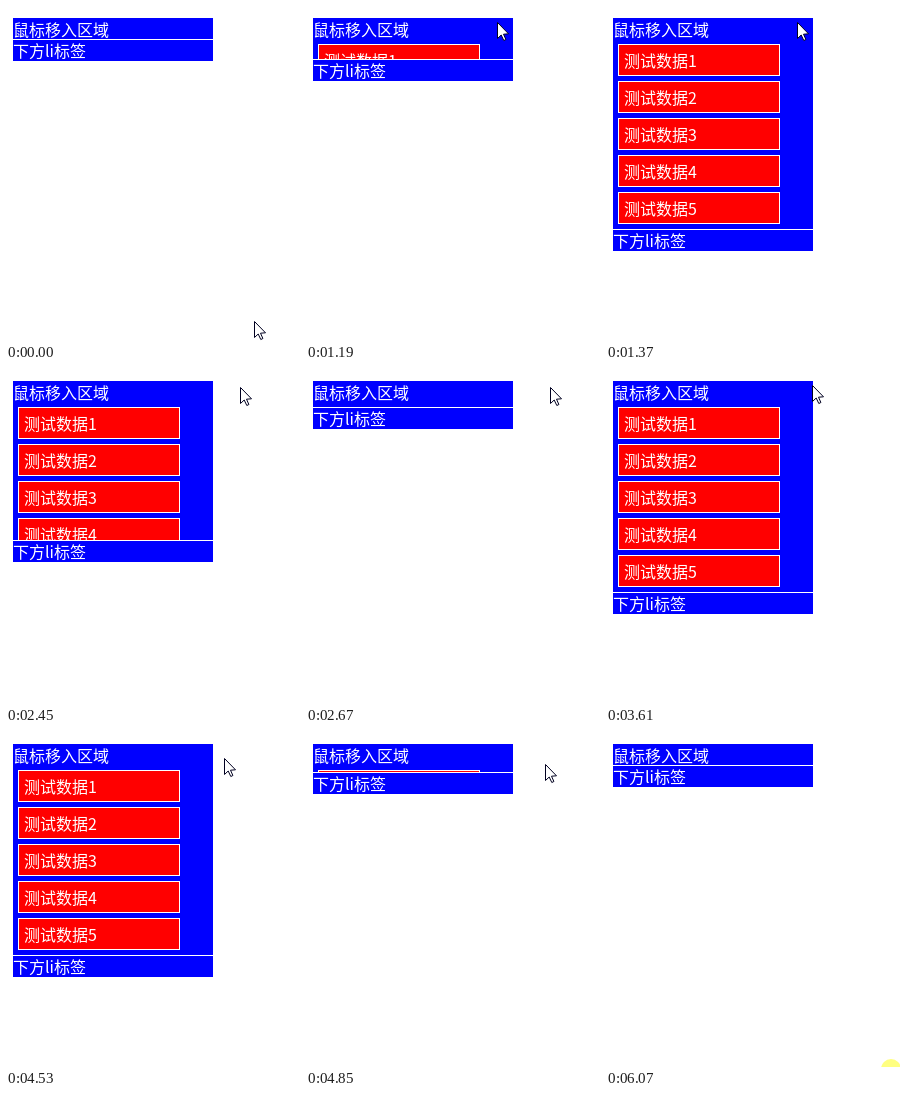
An HTML page that plays this animation: 294x335 px, repeating every 6.13 s.

```html
<!DOCTYPE html>
<html lang="zh-CN">
<head>
<meta charset="utf-8">
<title>滑动菜单</title>
<style>
  html, body { margin: 0; width: 100%; height: 100%; overflow: hidden; background: #fff; }
  svg { display: block; width: 294px; height: 335px; }
  text { font: 500 16px "Noto Sans CJK SC", sans-serif; fill: #fff; }
</style>
</head>
<body>
<svg viewBox="0 0 294 335">
  <defs>
    <clipPath id="clip"><rect id="view" x="7" y="33" width="200" height="0"/></clipPath>
  </defs>
  <rect id="back" x="7" y="12" width="200" height="43" fill="#00f"/>
  <text x="7" y="30">鼠标移入区域</text>
  <g id="items" clip-path="url(#clip)"></g>
  <g id="footer">
    <rect x="7" y="33" width="200" height="1" fill="#fff"/>
    <text x="7" y="51">下方li标签</text>
  </g>
  <circle id="glow" cx="285" cy="337" r="10" fill="#ffff80"/>
  <path id="cursor" d="M.5 .5V16.5L4.2 13L6.8 18.5L8.9 17.5L6.5 12.2L11.5 11.8Z"
        fill="#fff" stroke="#000020"/>
</svg>
<script>
const LOOP = 6130, STEP = 80, CLICK = 6070;
const ITEMS = 5, PITCH = 37, OPEN = 190;
const $ = id => document.getElementById(id);

// Cursor moves: where each one leads, and when
const home = { x: 248, y: 315 };
const moves = [
  { start: 80, end: 570, x: 203, y: 9 },
  { start: 1110, end: 1190, x: 191, y: 16 },
  { start: 2110, end: 2670, x: 244, y: 18 },
  { start: 3130, end: 3290, x: 206, y: 16 },
  { start: 4210, end: 4530, x: 218, y: 26 },
  { start: 4530, end: 4850, x: 239, y: 32 },
  { start: 4850, end: 5130, x: 296, y: 50 },
  { start: 5200, end: 5500, x: 296, y: 284 },
  { start: 5530, end: 5830, x: 283, y: 337 }
];

const progress = (t, start, end) => Math.min(1, Math.max(0, (t - start) / (end - start)));
const easeOut = p => p * (2 - p);
const swing = (t, start, length) => .5 - Math.cos(progress(t, start, start + length) * Math.PI) / 2;

// The picture refreshes in even steps counted from the latest move
function snap(t) {
  const start = moves.reduce((last, m) => m.start <= t ? m.start : last, 0);
  return start + Math.floor((t - start) / STEP) * STEP;
}

function cursorAt(t) {
  return moves.reduce((pos, m) => {
    const p = easeOut(progress(t, m.start, m.end));
    return { x: pos.x + (m.x - pos.x) * p, y: pos.y + (m.y - pos.y) * p };
  }, home);
}

// Opens on entering the header, closes on leaving it, twice
function panelHeight(t) {
  const open = swing(t, 1148, 200) - swing(t, 2276, 440) + swing(t, 3360, 200) - swing(t, 4524, 372);
  return Math.round(OPEN * open);
}

$('items').innerHTML = Array.from({ length: ITEMS }, (_, i) => {
  const y = 38 + PITCH * i;
  return `<rect x="12.5" y="${y + .5}" width="161" height="31" fill="#f00" stroke="#fff"/>
    <text x="18" y="${y + 23}">测试数据${i + 1}</text>`;
}).join('');

function draw(time) {
  const t = snap(time);
  const h = panelHeight(t);
  const { x, y } = cursorAt(t);
  $('view').setAttribute('height', h);
  $('back').setAttribute('height', 43 + h);
  $('footer').setAttribute('transform', `translate(0 ${h})`);
  $('cursor').setAttribute('transform', `translate(${Math.round(x)} ${Math.round(y)})`);
  $('glow').setAttribute('visibility', time >= CLICK ? 'visible' : 'hidden');
}

const origin = performance.now();
function tick() {
  draw((performance.now() - origin) % LOOP);
  requestAnimationFrame(tick);
}
tick();
</script>
</body>
</html>
```
